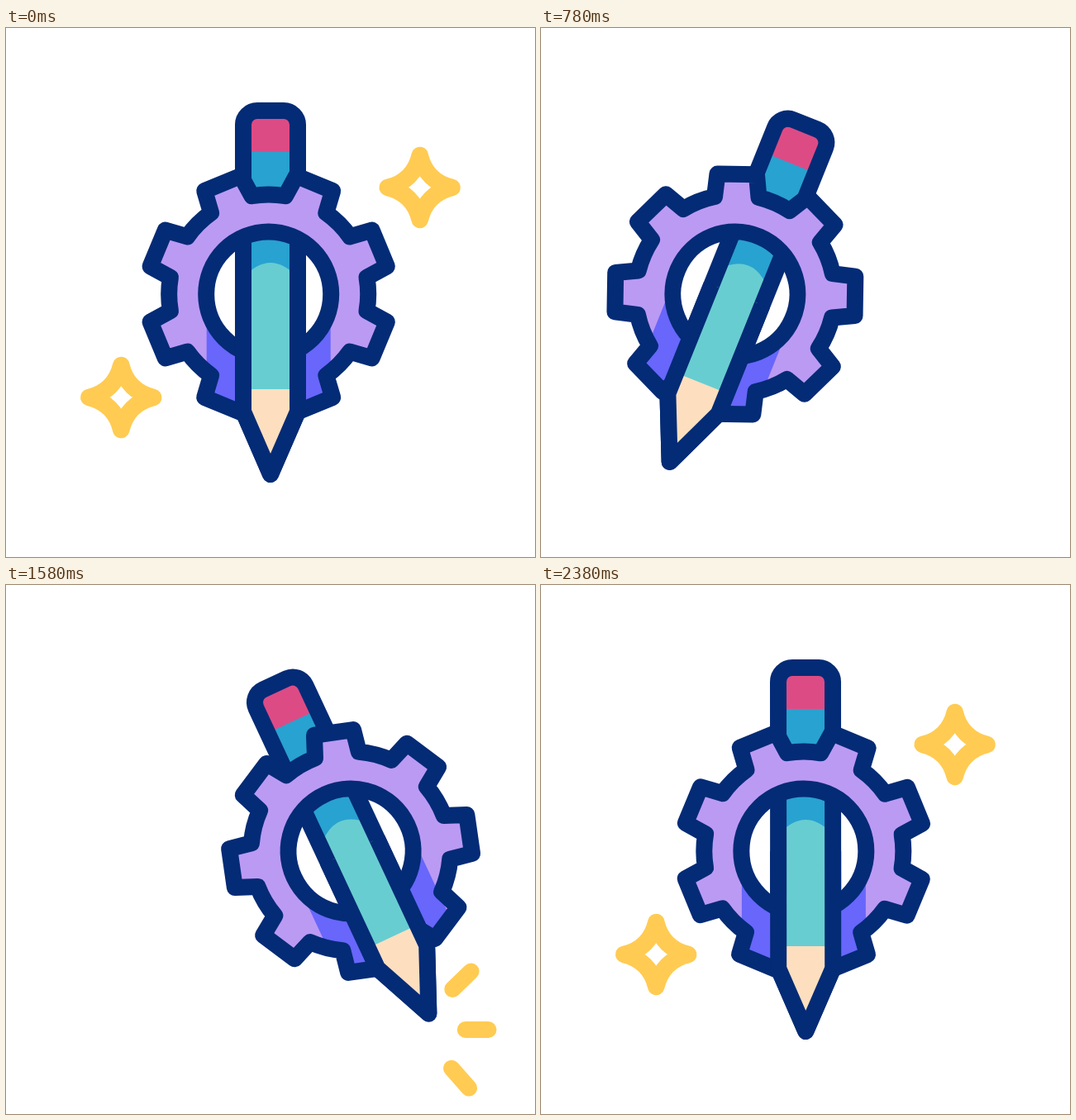
An HTML page with a canvas that plays this animation: 640 px wide and 640 px high, repeating every 2.4 s.

```html
<!DOCTYPE html>
<html>
<head>
<meta charset="utf-8">
<style>
  html, body { margin: 0; width: 100%; height: 100%; overflow: hidden; background: #fff; }
  canvas { display: block; }
</style>
</head>
<body>
<canvas id="stage" width="640" height="640"></canvas>
<script>
const ctx = document.getElementById('stage').getContext('2d');
const NAVY = '#042b76', PURPLE = '#bb9af3', SHADE = '#6866fb', PINK = '#dd4b85',
      BLUE = '#28a2d0', TEAL = '#68cdd1', CREAM = '#fddfbf', YELLOW = '#ffcb52';
const LOOP = 2400, RAD = Math.PI / 180;
const HUB = { x: 317.7, y: 322 };

// Keyframes are [time, value] pairs, eased in and out between neighbours.
function track(keys, t) {
  if (t <= keys[0][0]) return keys[0][1];
  for (let i = 1; i < keys.length; i++) {
    const [t0, a] = keys[i - 1], [t1, b] = keys[i];
    if (t < t1) {
      const u = (t - t0) / (t1 - t0);
      return a + (b - a) * u * u * (3 - 2 * u);
    }
  }
  return keys[keys.length - 1][1];
}

const SHIFT = [[0, 0], [825, -83.5], [907, -83.5], [1527, 100.5], [2400, 0]];
const TILT = [[0, 0], [825, 22.1], [907, 22.1], [1527, -25.3], [2400, 0]];
const SPIN = [[0, 0], [920, -23], [1508, 105.5], [1527, 105.5], [2400, 0]];
const LINE_END = [[907, 155], [1510, 487]];
const LINE_START = [[1270, 155], [1560, 487]];
const SPARK_END = [[1460, 0], [1590, 1]];
const SPARK_START = [[1530, 0], [1700, 1]];
const SPARKS = [[534, 495, 563, 467], [548, 538, 584, 538], [533, 578, 560.5, 609]];

const pencil = new Path2D('M287 464V117A17 17 0 0 1 304 100H336A17 17 0 0 1 353 117V464L320 540Z');
const paint = new Path2D('M287 302Q320 266 353 302L347 310V437H293V310Z');
const gear = gearPath();

function gearPath() {
  const path = new Path2D();
  for (let i = 0; i < 8; i++) {
    const mid = 22.5 + 45 * i;
    const at = (r, offset) => [r * Math.cos((mid + offset) * RAD), r * Math.sin((mid + offset) * RAD)];
    path.lineTo(...at(120.5, -12.8));
    path.lineTo(...at(147, -9.3));
    path.lineTo(...at(147, 9.3));
    path.arc(0, 0, 120.5, (mid + 12.8) * RAD, (mid + 32.2) * RAD);
  }
  path.closePath();
  path.moveTo(75.5, 0);
  path.arc(0, 0, 75.5, 0, 2 * Math.PI);
  return path;
}

function outline(path, color, width = 20) {
  ctx.strokeStyle = color;
  ctx.lineWidth = width;
  ctx.stroke(path);
}

function segment(x0, y0, x1, y1, color) {
  const path = new Path2D();
  path.moveTo(x0, y0);
  path.lineTo(x1, y1);
  outline(path, color);
}

function drawPencil() {
  ctx.save();
  ctx.clip(pencil);
  const band = (color, top, bottom) => { ctx.fillStyle = color; ctx.fillRect(280, top, 80, bottom - top); };
  band(BLUE, 95, 302);
  band(PINK, 95, 150);
  band(CREAM, 436, 547);
  ctx.fillStyle = TEAL;
  ctx.fill(paint);
  ctx.restore();
  outline(pencil, NAVY);
}

function drawGear(angle) {
  ctx.save();
  ctx.translate(HUB.x, HUB.y);
  ctx.rotate(angle);
  ctx.fillStyle = PURPLE;
  ctx.fill(gear, 'evenodd');
  // The shade stays aligned with the pencil while the teeth turn.
  ctx.save();
  ctx.clip(gear, 'evenodd');
  ctx.rotate(-angle);
  ctx.fillStyle = SHADE;
  ctx.fillRect(-75, 0, 150, 160);
  ctx.restore();
  outline(gear, NAVY);
  ctx.restore();
}

function drawTool(t) {
  const tilt = track(TILT, t);
  ctx.save();
  ctx.translate(HUB.x + track(SHIFT, t), HUB.y);
  ctx.rotate(tilt * RAD);
  ctx.translate(-HUB.x, -HUB.y);
  drawPencil();
  drawGear((track(SPIN, t) - tilt) * RAD);
  // The lower half of the pencil passes in front of the gear.
  ctx.beginPath();
  ctx.rect(200, HUB.y, 240, 260);
  ctx.clip();
  drawPencil();
  ctx.restore();
}

function drawStar(x, y, t, outDelay, inDelay) {
  const leave = t - outDelay, enter = t - inDelay;
  const returning = enter > 1820;
  const size = returning
    ? track([[1820, 0], [2120, 1.27], [2270, 1]], enter)
    : track([[0, 1], [200, 1.37], [500, 0]], leave);
  if (size <= 0) return;
  const angle = returning
    ? track([[1820, -80], [2120, 0]], enter)
    : track([[200, 0], [500, -52]], leave);
  const tip = 39 * size, waist = 7.5 * size;
  const path = new Path2D();
  path.moveTo(0, -tip);
  path.quadraticCurveTo(waist, -waist, tip, 0);
  path.quadraticCurveTo(waist, waist, 0, tip);
  path.quadraticCurveTo(-waist, waist, -tip, 0);
  path.quadraticCurveTo(-waist, -waist, 0, -tip);
  path.closePath();
  ctx.save();
  ctx.translate(x, y);
  ctx.rotate(angle * RAD);
  outline(path, YELLOW, 20.5);
  ctx.restore();
}

function drawSparks(t) {
  const from = track(SPARK_START, t), to = track(SPARK_END, t);
  if (to <= from) return;
  for (const [x0, y0, x1, y1] of SPARKS) {
    const dx = x1 - x0, dy = y1 - y0;
    segment(x0 + dx * from, y0 + dy * from, x0 + dx * to, y0 + dy * to, YELLOW);
  }
}

function draw(t) {
  ctx.fillStyle = '#fff';
  ctx.fillRect(0, 0, 640, 640);
  ctx.lineCap = ctx.lineJoin = 'round';
  drawStar(139.3, 447, t, 0, 0);
  drawStar(500.7, 193, t, 265, 110);
  const start = track(LINE_START, t), end = track(LINE_END, t);
  if (end > start) segment(start, 538.7, end, 538.7, TEAL);
  drawSparks(t);
  drawTool(t);
}

function frame() {
  draw(performance.now() % LOOP);
  requestAnimationFrame(frame);
}
frame();
</script>
</body>
</html>
```
